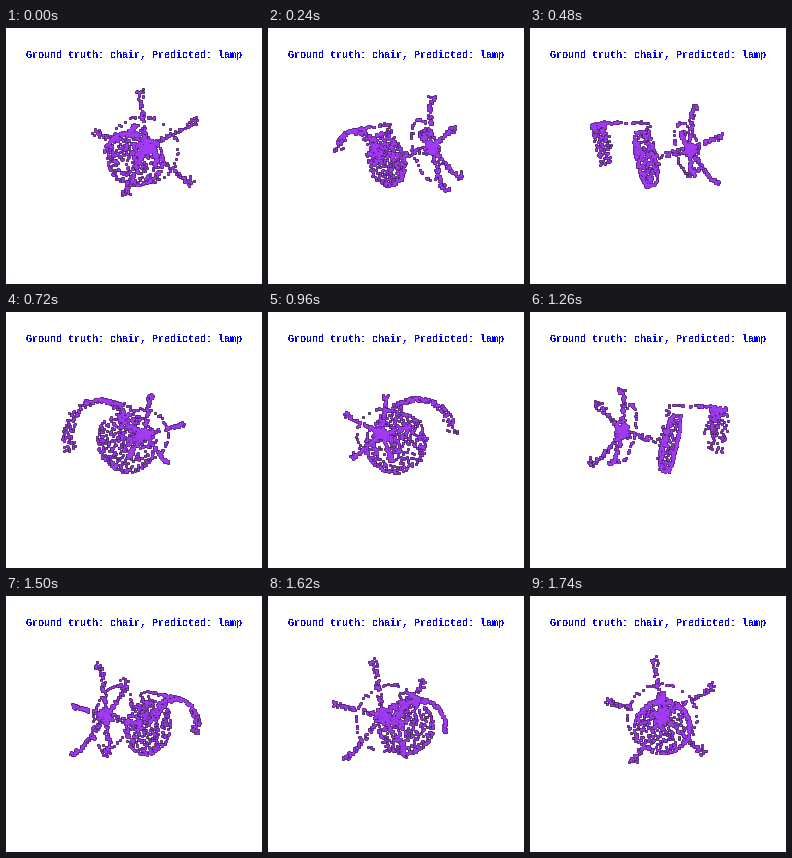
A matplotlib script that plays this animation: 256 px wide and 256 px high, repeating every 1800 ms.

```python
import numpy as np
import matplotlib.pyplot as plt
from matplotlib.animation import FuncAnimation

SIZE, DPI = 256, 100
FRAMES, INTERVAL = 30, 60
CAMERA = 200              # eye distance in pixels
YAW, TILT = np.radians([10, 12])
SHIFT = 4                 # sideways offset of the chair axis

rng = np.random.default_rng(7)


def uni(lo, hi, n):
    return rng.uniform(lo, hi, n)


def part(along, side, up):
    """Points in chair space: along the axis, sideways, towards the back."""
    return np.column_stack(np.broadcast_arrays(along, side, up))


def polar(along, radius, angle, up=0):
    return part(along, radius * np.cos(angle), up + radius * np.sin(angle))


def seat(n=330, rim=90):
    r = np.sqrt(uni(0, 1, n))
    face = rng.choice([-1, 1], n)
    a = np.concatenate([-13 + 6 * face * np.sqrt(1 - r ** 8), uni(-18, -8, rim)])
    r = np.concatenate([r, np.ones(rim)])
    t = uni(0, 2 * np.pi, n + rim)
    return part(a, 30 * r * np.cos(t), 28 * r * np.sin(t))


def backrest(n=190):
    t = np.radians(uni(-12, 165, n))
    return polar(uni(-57, -44, n), 33 + uni(-1.5, 1.5, n), t, up=8)


def spine(n=38):
    t = uni(0, 1, n)
    return part(-8 - 38 * t, uni(-2, 2, n), 36 + 6 * t + uni(-1, 1, n))


def bracket(n=24):
    return part(uni(-5, -2, n), uni(-5, 5, n), uni(-18, 36, n))


def foot_ring(n=70):
    return polar(32 + uni(-1, 1, n), 29 + uni(-1, 1, n), uni(0, 2 * np.pi, n))


def column(n=50):
    return polar(uni(-7, 38, n), 2.5, uni(0, 2 * np.pi, n))


def hub(n=90):
    return polar(uni(31, 43, n), 6 * np.sqrt(uni(0, 1, n)), uni(0, 2 * np.pi, n))


def leg(angle, n=48, wheel=14):
    t = uni(0, 1, n)
    r = np.concatenate([4 + 37 * t, uni(38, 45, wheel)])
    a = np.concatenate([37 + 9 * t + uni(-2, 2, n), uni(46, 52, wheel)])
    off = np.concatenate([uni(-1.6, 1.6, n), uni(-3, 3, wheel)])
    c, s = np.cos(angle), np.sin(angle)
    return part(a, r * c - off * s, r * s + off * c)


legs = [leg(np.radians(98 + 72 * k)) for k in range(5)]
cloud = np.vstack([seat(), backrest(), spine(), bracket(),
                   foot_ring(), column(), hub(), *legs])

# lean the chair axis upwards
along, side, up = cloud.T
u = along * np.cos(TILT) - up * np.sin(TILT)
v = along * np.sin(TILT) + up * np.cos(TILT)
w = side + SHIFT


def project(angle):
    c, s = np.cos(angle), np.sin(angle)
    scale = CAMERA / (CAMERA - (u * c - w * s))
    x = SIZE / 2 + scale * (u * s + w * c)
    y = SIZE / 2 - scale * v
    return np.column_stack([x, y])


plt.rcParams["text.antialiased"] = False
px = 72 / DPI
fig = plt.figure(figsize=(SIZE / DPI, SIZE / DPI), dpi=DPI, facecolor="white")
ax = fig.add_axes([0, 0, 1, 1])
ax.set(xlim=(0, SIZE), ylim=(SIZE, 0))
ax.axis("off")

ax.text(20, 30, "Ground truth: chair, Predicted: lamp", color="#0000ff",
        family="Liberation Mono", weight="bold", size=10 * px)


def dots(color, diameter):
    return ax.scatter(u, v, s=(diameter * px) ** 2, c=color,
                      linewidths=0, antialiased=False)


layers = [dots("black", 3.1), dots("#a23cf4", 2.2)]


def update(i):
    points = project(YAW + 2 * np.pi * i / FRAMES)
    for layer in layers:
        layer.set_offsets(points)
    return layers


anim = FuncAnimation(fig, update, frames=FRAMES, interval=INTERVAL,
                     repeat=True, repeat_delay=0)
plt.show()
```
